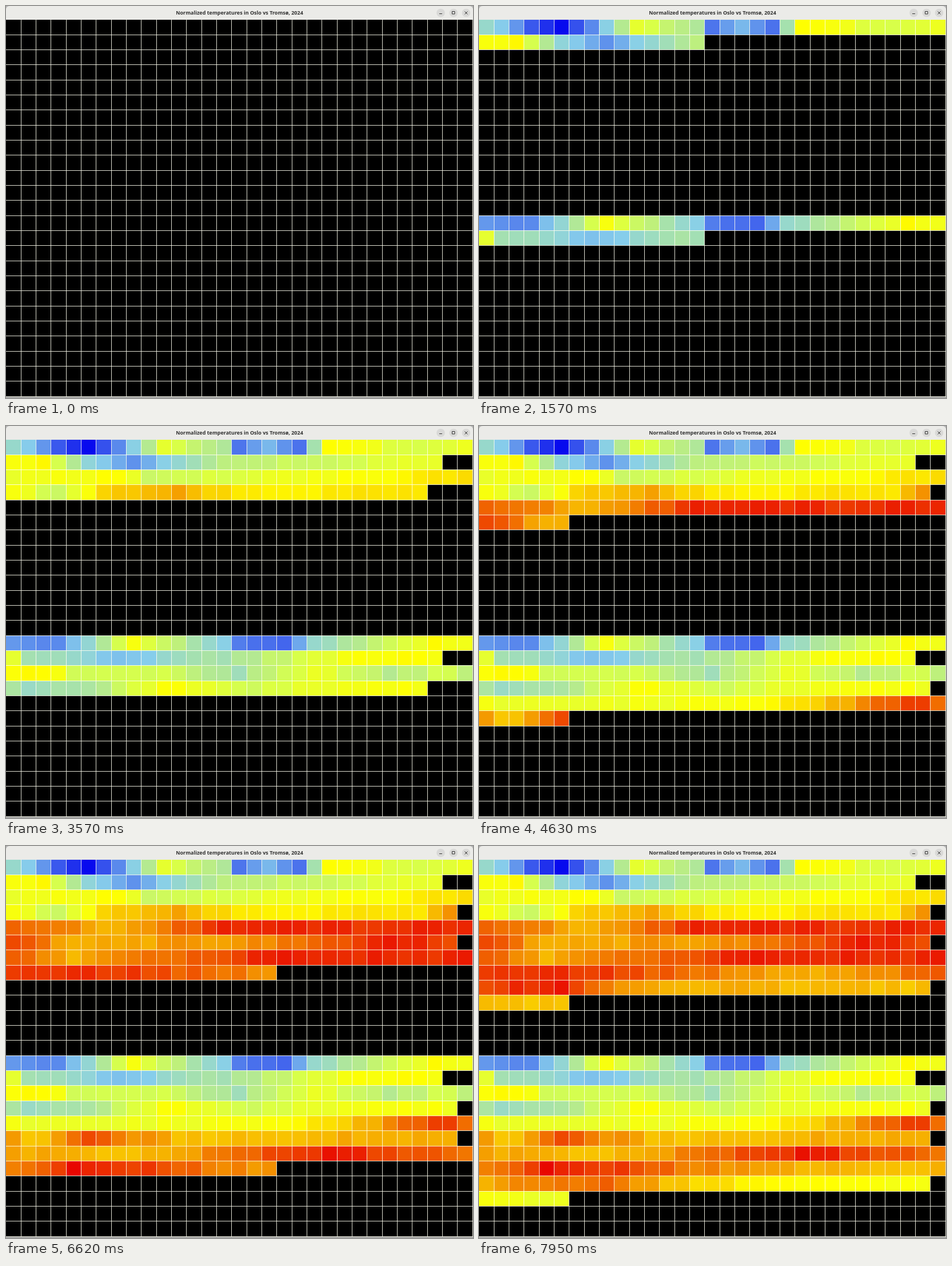
Write an HTML page with a canvas that moves like this. It is 817 px wide and 685 px high and loops after 8 s.

```html
<!DOCTYPE html>
<html lang="en">
<head>
<meta charset="utf-8">
<title>Normalized temperatures</title>
<style>
  html, body { margin: 0; width: 100%; height: 100%; overflow: hidden; background: #000; }
  canvas { display: block; }
</style>
</head>
<body>
<canvas id="stage" width="817" height="685"></canvas>
<script>
const ctx = document.getElementById('stage').getContext('2d');
const W = 817, H = 685, TOP = 24, BOTTOM = 683;
const COLS = 31, ROWS = 25, CELL = (W - 1) / COLS;
const LOOP = 8000, FIRST_DAY_AT = 309, DAYS_PER_MS = 0.03667;
const YEAR = 2024, LAST_DAY = 280, DAILY_SWING = 0.6;

// Temperature level: 0 coldest, 30 warmest
const SCALE = [
  [0, [0, 0, 238]], [10, [135, 206, 235]], [17, [215, 255, 75]],
  [20, [255, 255, 0]], [24, [246, 176, 0]], [30, [232, 0, 0]]
];

// Turning points of each year: [day, level]
const OSLO = [
  [0, 12], [5, 0], [10, 18], [14, 14], [15, 6], [17, 9], [19, 5], [21, 20],
  [27, 17], [33, 20], [36, 11], [39, 7], [45, 15], [60, 18.5], [67, 20], [69, 16],
  [90, 21.5], [94, 15.5], [97, 22], [102, 24], [107, 20.5], [118, 21.5], [121, 27],
  [128, 23.7], [135, 28.5], [151, 28.5], [156, 24], [168, 25], [178, 29], [186, 24],
  [200, 29], [219, 28.3], [235, 24], [241, 26], [249, 29.5], [253, 24.3], [280, 22.7]
];
const TROMSO = [
  [0, 8], [3, 6.5], [8, 19], [14, 10], [15, 6], [18, 5], [20, 11], [28, 20],
  [31, 18], [32, 13], [38, 9.5], [45, 13], [54, 19.5], [63, 20], [64, 17], [70, 17],
  [75, 12.7], [80, 19], [85, 14], [89, 17], [92, 12], [96, 13.3], [101, 20],
  [107, 16.5], [115, 20], [125, 18], [140, 20], [150, 28.5], [153, 22.5], [157, 27],
  [164, 23], [180, 24.5], [190, 23], [203, 29], [214, 25.5], [217, 29.5],
  [229, 25], [240, 22.8], [252, 27], [257, 22.5], [263, 20], [280, 18.7]
];

const mix = (a, b, k) => a + (b - a) * k;

// Finds the segment around x and the position within it
function locate(points, x) {
  let i = 0;
  while (i < points.length - 2 && x >= points[i + 1][0]) i++;
  const [a, b] = [points[i], points[i + 1]];
  const k = Math.min(1, Math.max(0, (x - a[0]) / (b[0] - a[0])));
  return [a[1], b[1], k];
}

function colorAt(level) {
  const [a, b, k] = locate(SCALE, level);
  return `rgb(${a.map((c, i) => Math.round(mix(c, b[i], k))).join()})`;
}

function seeded(seed) {
  return () => {
    seed = (seed * 16807) % 2147483647;
    return seed / 2147483647;
  };
}

function dailyColors(points, seed) {
  const random = seeded(seed);
  return Array.from({ length: LAST_DAY }, (_, day) => {
    const swing = (random() * 2 - 1) * DAILY_SWING;
    return colorAt(mix(...locate(points, day)) + swing);
  });
}

const osloColors = dailyColors(OSLO, 59);
const tromsoColors = dailyColors(TROMSO, 69);

const colX = i => Math.floor(i * CELL);
const rowY = i => Math.floor(TOP + i * CELL);

// One row per month, one cell per day
function drawCells(colors, count, firstRow) {
  for (let day = 0; day < Math.min(count, LAST_DAY); day++) {
    const date = new Date(YEAR, 0, day + 1);
    const col = date.getDate() - 1, row = firstRow + date.getMonth();
    const x = colX(col), y = rowY(row);
    ctx.fillStyle = colors[day];
    ctx.fillRect(x, y, colX(col + 1) - x, rowY(row + 1) - y);
  }
}

function drawGrid() {
  ctx.fillStyle = 'rgba(255, 255, 240, 0.87)';
  for (let r = 1; r <= ROWS; r++) ctx.fillRect(0, rowY(r), W, 1);
  for (let c = 1; c <= COLS; c++) ctx.fillRect(colX(c), TOP, 1, BOTTOM - TOP);
}

function drawWindow() {
  ctx.fillStyle = '#b4b4b4';
  ctx.fillRect(0, 0, W, TOP);
  ctx.fillStyle = '#ebebe8';
  ctx.beginPath();
  ctx.roundRect(0, 0, W, TOP, [6, 6, 0, 0]);
  ctx.fill();
  ctx.fillStyle = '#a4a4a4';
  ctx.fillRect(0, BOTTOM, W, H - BOTTOM);

  ctx.fillStyle = '#303030';
  ctx.font = 'bold 9px "Noto Sans", sans-serif';
  ctx.textAlign = 'center';
  ctx.fillText('Normalized temperatures in Oslo vs Tromsø, 2024', 408.5, 15);

  ctx.fillStyle = '#d9d9d7';
  for (const x of [760.5, 783, 805]) {
    ctx.beginPath();
    ctx.arc(x, 12, 7.3, 0, 2 * Math.PI);
    ctx.fill();
  }
  ctx.strokeStyle = '#333';
  ctx.lineWidth = 1;
  ctx.beginPath();
  ctx.moveTo(758, 13.5); ctx.lineTo(763, 13.5);
  ctx.rect(780.5, 9.5, 4.5, 4.5);
  ctx.moveTo(802.5, 9.5); ctx.lineTo(807.5, 14.5);
  ctx.moveTo(807.5, 9.5); ctx.lineTo(802.5, 14.5);
  ctx.stroke();
}

function draw(t) {
  const count = Math.floor((t - FIRST_DAY_AT) * DAYS_PER_MS);
  ctx.fillStyle = '#000';
  ctx.fillRect(0, 0, W, H);
  drawCells(osloColors, count, 0);
  drawCells(tromsoColors, count, 13);
  drawGrid();
  drawWindow();
}

const start = performance.now();
function tick() {
  draw((performance.now() - start) % LOOP);
  requestAnimationFrame(tick);
}
tick();
</script>
</body>
</html>
```
